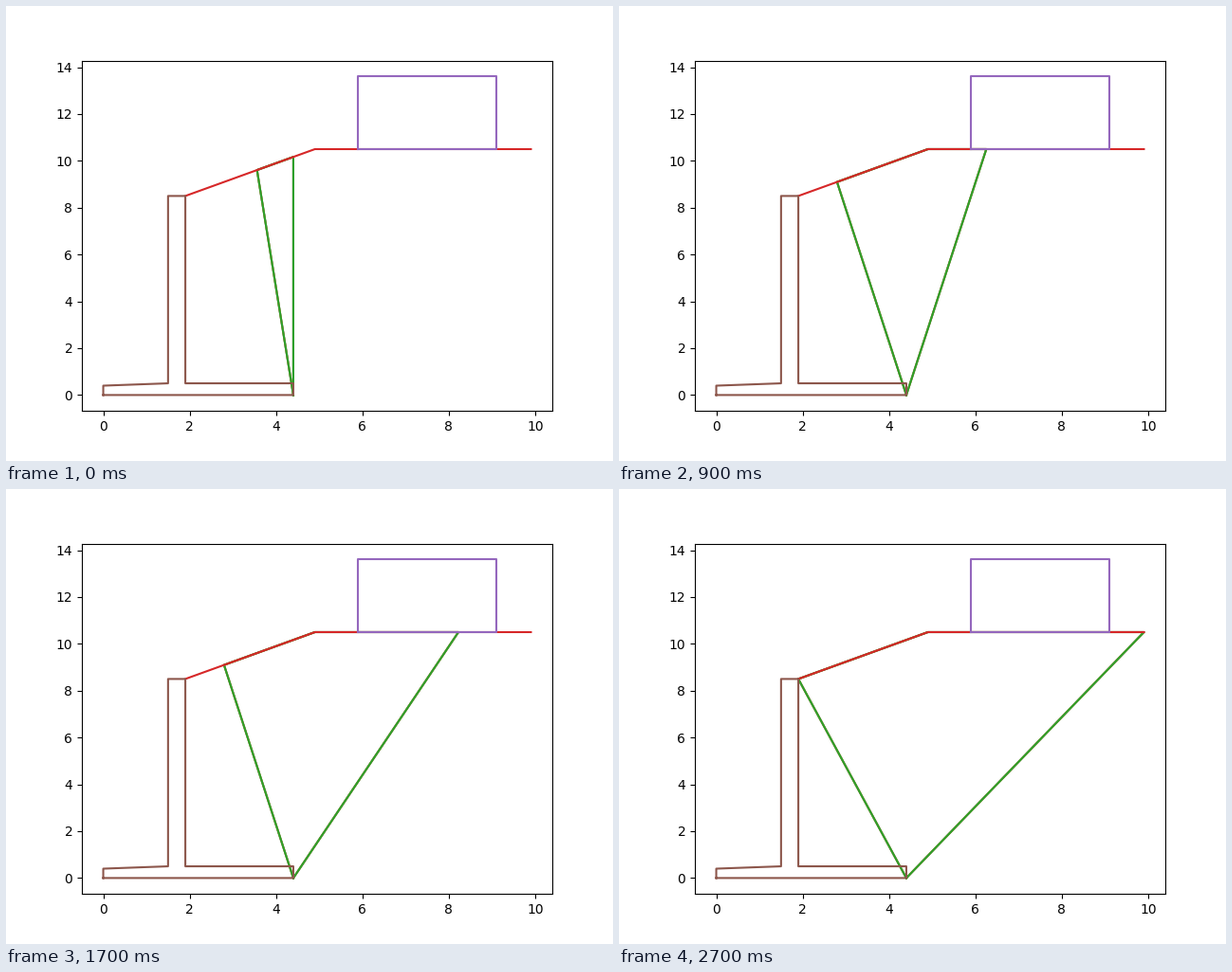
Animation of 640 by 480 pixels, one loop 2.8 s. Source, as a matplotlib script:

```python
import math

import matplotlib.pyplot as plt
from matplotlib.animation import FuncAnimation

HEEL = (4.4, 0.0)
CREST = (1.9, 8.5)
BREAK = (4.9, 10.5)
END = (9.9, 10.5)
SLOPE = (BREAK[1] - CREST[1]) / (BREAK[0] - CREST[0])

LEFT_ANGLES = (5, 10, 15, 20)
RIGHT_ANGLES = (0, 5, 10, 15, 20, 25, 30)

WALL = [(0, 0), (0, 0.4), (1.5, 0.5), (1.5, 8.5), CREST,
        (1.9, 0.5), (4.4, 0.5), HEEL, (0, 0)]
LOAD = [(5.9, 10.5), (5.9, 13.6), (9.1, 13.6), (9.1, 10.5), (5.9, 10.5)]


def surface_hit(degrees):
    """Where a ray from the heel, leaning right by the angle, meets the ground."""
    lean = math.tan(math.radians(degrees))
    # Sloping part: y = crest + SLOPE * (x - crest), x = heel + lean * y
    y = (CREST[1] + SLOPE * (HEEL[0] - CREST[0])) / (1 - SLOPE * lean)
    x = HEEL[0] + lean * y
    if x < CREST[0]:
        return CREST
    if x <= BREAK[0]:
        return x, y
    return min(HEEL[0] + lean * END[1], END[0]), END[1]


def wedge(left_angle, right_angle):
    left, right = surface_hit(-left_angle), surface_hit(right_angle)
    top = [left, BREAK, right] if right[0] > BREAK[0] else [left, right]
    return [HEEL, *top, HEEL]


fig, ax = plt.subplots(figsize=(6.4, 4.8), dpi=100)


def polyline(points, color):
    return ax.plot(*zip(*points), color=color, lw=1.5)[0]


# Stacked outlines of the same wedge; only the topmost shows fully
wedge_lines = [polyline(wedge(LEFT_ANGLES[0], RIGHT_ANGLES[0]), c)
               for c in ("C0", "C1", "C2")]
polyline([CREST, BREAK, END], "C3")
polyline(LOAD, "C4")
polyline(WALL, "C5")

ax.set_xlim(-0.495, 10.395)
ax.set_ylim(-0.68, 14.28)


def update(frame):
    row, col = divmod(frame, len(LEFT_ANGLES))
    xs, ys = zip(*wedge(LEFT_ANGLES[col], RIGHT_ANGLES[row]))
    for line in wedge_lines:
        line.set_data(xs, ys)
    return wedge_lines


anim = FuncAnimation(fig, update, interval=100, repeat=True, repeat_delay=0,
                     frames=len(LEFT_ANGLES) * len(RIGHT_ANGLES))
plt.show()
```
